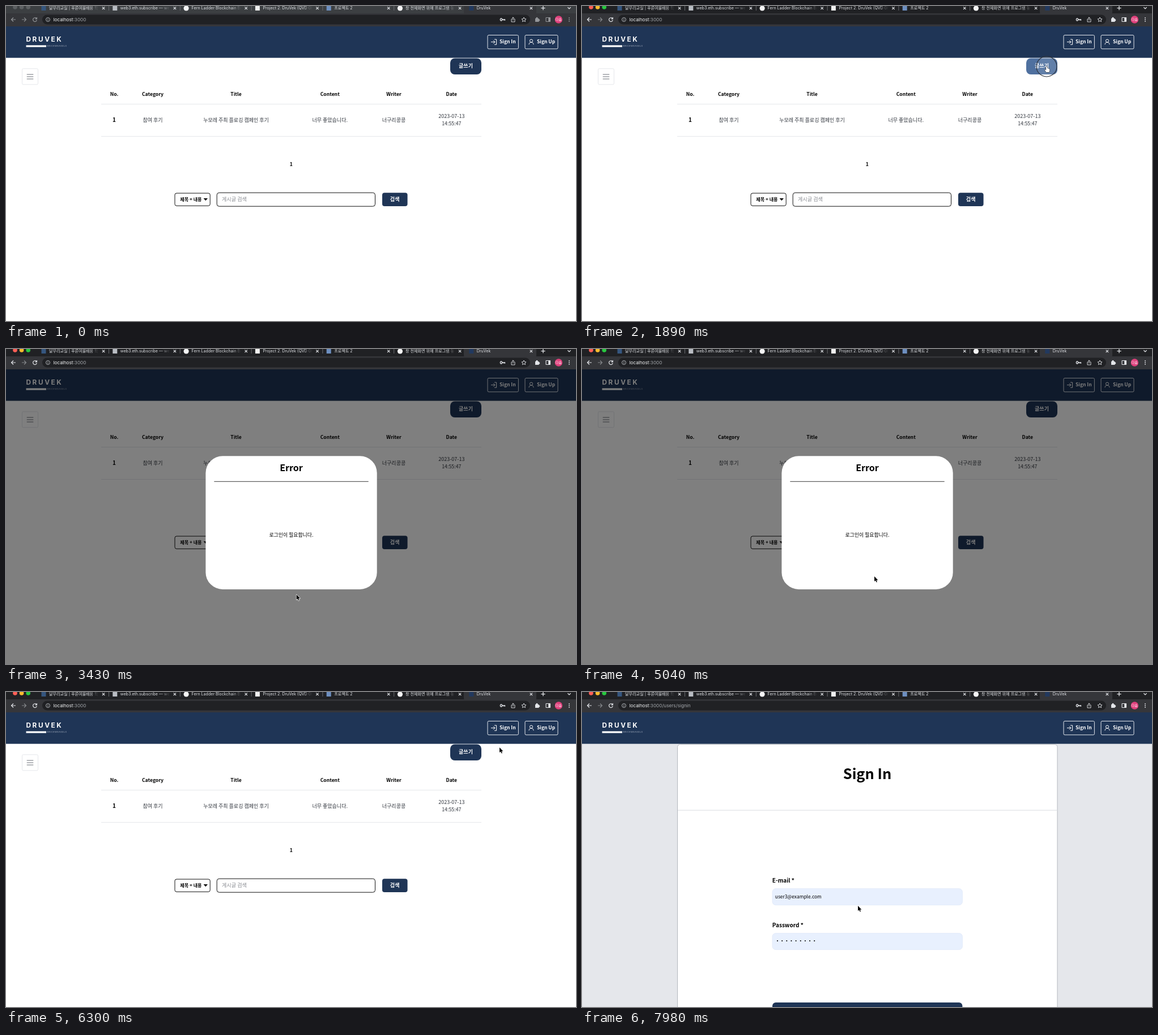
These frames come from a looping animation (1006 by 557 pixels, 8000 ms). An HTML page with a canvas:

```html
<!DOCTYPE html>
<html lang="ko">
<head>
<meta charset="utf-8">
<title>DruVek</title>
<style>
html, body { margin: 0; width: 100%; height: 100%; overflow: hidden; background: #fff; }
canvas { display: block; width: 1006px; height: 557px; }
</style>
</head>
<body>
<canvas id="stage"></canvas>
<script>
const W = 1006, H = 557, LOOP = 8000, STEP = 70;
const NAVY = '#1f3556', HOVER = '#4f709f', LINE = '#e5e7eb', INK = '#000', CELL = '#30353d', HINT = '#9a9da3';
const PAGE = '"Noto Sans CJK KR", "Noto Sans KR", "Noto Sans CJK", "Noto Sans", sans-serif';
const UI = 'Inter, "Noto Sans CJK KR", "Noto Sans CJK", sans-serif';

const T = {
  active: 1400, hoverOn: 1540, open: 1960, close: 5110,
  signIn: 6860, autofill: 7140
};
const CLICKS = [1330, 1820, 5045, 6720];

// Cursor legs: start, end, then the points passed through.
const LEGS = [
  [280, 350, [495, 503]],
  [350, 420, [584, 352]],
  [560, 770, [778, 136]],
  [910, 1120, [807, 115]],
  [1190, 1330, [820, 107]],
  [2310, 2520, [592, 329]],
  [2660, 2940, [497, 441]],
  [3010, 3080, [518, 424]],
  [3290, 3640, [511, 437], [540, 390], [533, 403]],
  [4060, 4270, [500, 423]],
  [4340, 4410, [520, 407]],
  [4760, 4970, [516, 402]],
  [5530, 5810, [481, 352], [560, 303]],
  [5950, 6090, [861, 112]],
  [6230, 6300, [871, 98]],
  [6300, 6510, [884, 67]],
  [7140, 7910, [487, 378]]
];

const canvas = document.getElementById('stage');
const ratio = window.devicePixelRatio || 1;
canvas.width = W * ratio;
canvas.height = H * ratio;
const g = canvas.getContext('2d');
g.scale(ratio, ratio);

const clamp = v => Math.max(0, Math.min(1, v));
const progress = (t, a, b) => clamp((t - a) / (b - a));
const ease = p => p * p * (3 - 2 * p);

function mix(a, b, p) {
  const part = (c, i) => parseInt(c.slice(i, i + 2), 16);
  return 'rgb(' + [1, 3, 5].map(i => Math.round(part(a, i) + (part(b, i) - part(a, i)) * p)) + ')';
}

function text(str, x, cy, size, { color = INK, weight = 400, align = 'left', font = PAGE, gap = 0 } = {}) {
  g.font = `${weight} ${size}px ${font}`;
  g.textAlign = align;
  g.letterSpacing = gap + 'px';
  g.fillStyle = color;
  g.fillText(str, x, cy + size * 0.36);
}

function rect(x, y, w, h, color) {
  g.fillStyle = color;
  g.fillRect(x, y, w, h);
}

function box(x, y, w, h, r, fill, stroke, width = 1) {
  g.beginPath();
  g.roundRect(x, y, w, h, r);
  if (fill) { g.fillStyle = fill; g.fill(); }
  if (stroke) { g.strokeStyle = stroke; g.lineWidth = width; g.stroke(); }
}

function disc(x, y, r, fill) {
  g.beginPath();
  g.arc(x, y, r, 0, 7);
  g.fillStyle = fill;
  g.fill();
}

function stroke(d, x, y, color, width = 1.1) {
  g.save();
  g.translate(x, y);
  g.strokeStyle = color;
  g.lineWidth = width;
  g.stroke(new Path2D(d));
  g.restore();
}

function fadeText(str, x, end) {
  const grad = g.createLinearGradient(x, 0, end, 0);
  grad.addColorStop(0, '#dfe1e5');
  grad.addColorStop(0.82, '#dfe1e5');
  grad.addColorStop(1, 'rgba(223,225,229,0)');
  g.save();
  g.beginPath();
  g.rect(x, 0, end - x, 13);
  g.clip();
  text(str, x, 3.4, 7.1, { color: grad, font: UI });
  g.restore();
}

const TABS = [
  '달무리교실 | 푸른여울배움 학습', 'web3.eth.subscribe — web3', 'Fern Ladder Blockchain Boot',
  'Project 2. DruVek (QVD 08)', '프로젝트 2', '창 전체화면 위에 프로그램 놓기', 'DruVek'
];

function tabIcon(i, x) {
  if (i === 2 || i === 5) return disc(x, 4, 4.6, '#f4f4f5');
  const color = ['#35567f', '#b9bdc3', '', '#f1f1f1', '#6d8fc0', '', '#22395f'][i];
  rect(x - 4, 0, 8, 8, color);
}

function chrome(active, path) {
  const light = '#e4e6ea', dim = '#85878b', tone = active ? light : '#94969a';
  rect(0, 0, W, 14, active ? '#202124' : '#3c3f42');
  box(808, -8, 128, 24, 5, '#35363a');
  rect(0, 13, W, 23, '#35363a');
  ['#ff5f57', '#febc2e', '#28c840'].forEach((c, i) => disc(16 + i * 11.6, 2, 3.8, active ? c : '#5d6063'));
  TABS.forEach((name, i) => {
    const x = 66.5 + i * 125.8;
    tabIcon(i, x);
    fadeText(name, x + 9.5, x + 97);
    stroke('M-2.2 -2.2L2.2 2.2M2.2 -2.2L-2.2 2.2', x + 105.6, 3.8, '#dfe1e5');
    if (i < 5) rect(x + 114.5, 0, 1, 8, '#6a6c70');
  });
  stroke('M-3.6 0H3.6M0 -3.6V3.6', 948, 3.6, light, 1.3);
  stroke('M-2.6 -1.3L0 1.3L2.6 -1.3', 994, 3.6, light, 1.3);

  const arrow = 'M4 0H-3.4M0 -3.5L-3.5 0L0 3.5';
  stroke(arrow, 13, 24, tone, 1.2);
  stroke('M-4 0H3.4M0 -3.5L3.5 0L0 3.5', 32, 24, dim, 1.2);
  stroke('M2.5 -2.2A3.4 3.4 0 1 0 3.3 1M3.4 -4V-1.2H0.6', 51, 24, tone, 1.2);
  box(64, 15.5, 861, 17, 8.5, '#202124');
  stroke('M3.5 0A3.5 3.5 0 1 1 -3.5 0A3.5 3.5 0 1 1 3.5 0M0 -0.4V2M0 -2V-1.1', 74, 24, '#bdc1c6', 0.9);
  const opt = { font: UI };
  text('localhost', 83.5, 24, 8.2, { ...opt, color: '#f1f3f4' });
  const x = 83.5 + g.measureText('localhost').width;
  text(':3000' + path, x, 24, 8.2, { ...opt, color: '#a4a8ad' });
  stroke('M-1 0A1.6 1.6 0 1 1 -4 0A1.6 1.6 0 1 1 -1 0H4V1.8M2 0V1.6', 876.5, 24, light, 1.3);
  stroke('M-1.5 -1H-3V4H3V-1H1.5M0 1.5V-4M-1.8 -2.4L0 -4.2L1.8 -2.4', 895, 24, light, 0.9);
  stroke('M0 -4L1.2 -1.3L4 -1L1.9 0.9L2.5 3.7L0 2.2L-2.5 3.7L-1.9 0.9L-4 -1L-1.2 -1.3Z', 914, 24, light, 0.9);
  rect(934, 22, 6.5, 6, tone);
  disc(937, 21.5, 1.7, tone);
  disc(940.6, 25, 1.7, tone);
  box(953, 20.5, 7.5, 7, 0.5, null, tone, 1.1);
  rect(957.2, 20.5, 3.3, 7, tone);
  disc(975.3, 24, 6.7, '#e0407c');
  text('다솜', 975.3, 24, 6, { color: '#fff', align: 'center' });
  for (let i = -1; i < 2; i++) disc(994, 24 + i * 3, 0.9, tone);
}

function header() {
  rect(0, 36, W, 55.8, NAVY);
  text('DRUVEK', 35.5, 59, 11.8, { color: '#fff', weight: 700, font: UI, gap: 2.6 });
  rect(35.5, 69.4, 35.5, 3.2, '#fff');
  text('BRICKWEASELS', 72.5, 71, 3.7, { color: '#aab3c2', font: UI, gap: 0.55 });
  box(850, 51.5, 54.4, 24.3, 2, null, '#e3e7ed');
  box(916, 51.5, 58, 24.3, 2, null, '#e3e7ed');
  stroke('M-5 0H2M-1 -3L2 0L-1 3M1 -4.6H4.6V4.6H1', 861, 63.6, '#fff', 1);
  stroke('M2.6 -1.8A2.6 2.6 0 1 1 -2.6 -1.8A2.6 2.6 0 1 1 2.6 -1.8M-4 4.8C-4 2 -2 0.8 0 0.8S4 2 4 4.8', 927, 63.4, '#fff', 1);
  text('Sign In', 871, 63, 8.5, { color: '#fff', weight: 700 });
  text('Sign Up', 937, 63, 8.5, { color: '#fff', weight: 700 });
}

const COLUMNS = [
  ['No.', 191, '1'], ['Category', 259, '참여 후기'], ['Title', 406, '누모레 주최 플로깅 캠페인 후기'],
  ['Content', 571.7, '너무 좋았습니다.'], ['Writer', 684.5, '너구리콩콩'], ['Date', 786.3, '']
];

function board(hover) {
  const mid = { align: 'center' }, strong = { align: 'center', weight: 700 };
  rect(0, 91.8, W, H, '#fff');
  box(28.5, 110.8, 28, 28, 2, '#fff', LINE);
  for (let y = 121; y < 130; y += 4) rect(36.7, y - 0.5, 11.6, 1, '#6b6f76');
  box(784, 92.5, 55, 28.5, 8, mix(NAVY, HOVER, hover));
  text('글쓰기', 811.5, 106, 9, { ...strong, color: '#fff' });

  COLUMNS.forEach(([head, x, cell], i) => {
    text(head, x, 155.8, 8.6, strong);
    text(cell, x, 201.3, i ? 9 : 10, i ? { ...mid, color: CELL } : strong);
  });
  text('2023-07-13', 786.3, 194.3, 9, { ...mid, color: CELL });
  text('14:55:47', 786.3, 208.3, 8.8, { ...mid, color: CELL });
  rect(168, 173, 671, 1, LINE);
  rect(168, 230, 671, 1, LINE);
  text('1', 503.4, 279.5, 8.6, strong);

  box(298, 331, 62.2, 22.3, 3, '#fff', '#111');
  text('제목 + 내용', 307.3, 341.7, 8.1, { weight: 700 });
  g.fillStyle = INK;
  g.fill(new Path2D('M348.6 340H356L352.3 344.3Z'));
  box(372.2, 330.2, 279.3, 24, 4, '#fff', '#111');
  text('게시글 검색', 381, 341.7, 9.1, { color: '#85888e' });
  box(664, 330.3, 44.6, 23.6, 4, NAVY);
  text('검색', 686.2, 341.7, 9.1, { ...strong, color: '#fff' });
}

function modal() {
  rect(0, 36, W, H, 'rgba(0,0,0,0.5)');
  box(352.4, 189.3, 302.3, 235.6, 30, '#fff');
  text('Error', 503.5, 210.5, 16, { align: 'center', weight: 700 });
  rect(367.3, 233.8, 272.4, 1, '#3a3a3a');
  text('로그인이 필요합니다.', 503.4, 328.8, 8.9, { align: 'center' });
}

function field(label, y, filled) {
  text(label, 335.8, y - 14, 10, { weight: 700 });
  box(336, y, 335.4, 29, 6, filled ? '#e8f0fe' : '#fff', filled ? '#e3ebfa' : LINE);
}

function login(filled, ready) {
  rect(0, 91.8, W, H, LINE);
  box(168.5, 92.5, 670.5, H, 5, '#fff', '#b4b8be');
  text('Sign In', 503.5, 145, 25.4, { align: 'center', weight: 700 });
  rect(169, 208.5, 669.5, 1.2, '#dfe1e5');
  field('E-mail *', 347.7, filled);
  field('Password *', 426.6, filled);
  if (filled) {
    text('user3@example.com', 340.8, 361.5, 8.4);
    for (let i = 0; i < 9; i++) disc(345 + i * 8.15, 440, 1.05, INK);
  } else {
    text('example@inbox.test', 340.8, 361.5, 8.4, { color: HINT });
    text('비밀번호를 입력하세요', 340.8, 440.2, 8.9, { color: HINT });
  }
  box(336, 549, 335.4, 30, 6, mix('#6b7280', NAVY, ready));
}

function along(points, p) {
  const s = p * (points.length - 1);
  const i = Math.min(Math.floor(s), points.length - 2);
  const [a, b] = [points[i], points[i + 1]];
  return [a[0] + (b[0] - a[0]) * (s - i), a[1] + (b[1] - a[1]) * (s - i)];
}

function cursorAt(t) {
  let pos = LEGS[0][2];
  for (const [a, b, ...points] of LEGS) {
    if (t <= a) break;
    pos = along([pos, ...points], ease(progress(t, a, b)));
  }
  return pos;
}

const ARROW = new Path2D('M0 0V9L2.1 7.2L3.6 10.5L5 9.9L3.6 6.7H6.4Z');
const HAND = new Path2D('M-0.9 0Q0.1 -1.2 1.1 0V3.2Q2.2 2.8 2.8 3.6Q3.8 3.2 4.2 4.2Q5.4 4 5.4 5.2V7.2L4.4 10H-0.8L-3.2 6.6Q-3.6 5 -2.2 5.4L-0.9 6.6Z');

function cursor(t) {
  if (t < 350) return;
  const [x, y] = cursorAt(t);
  const click = CLICKS.find(c => t > c && t < c + 140);
  if (click) {
    g.beginPath();
    g.arc(x, y, 14 + 8 * progress(t, click, click + 140), 0, 7);
    g.fillStyle = 'rgba(255,255,255,0.1)';
    g.fill();
    g.strokeStyle = '#2b2f36';
    g.lineWidth = 1.1;
    g.stroke();
  }
  const hand = (t >= T.active && t < 2030) || (t >= 6440 && t <= T.autofill);
  g.save();
  g.translate(x, y);
  g.lineJoin = 'round';
  g.lineWidth = hand ? 1 : 1.4;
  g.strokeStyle = hand ? '#111' : '#fff';
  g.fillStyle = hand ? '#fff' : '#000';
  g.stroke(hand ? HAND : ARROW);
  g.fill(hand ? HAND : ARROW);
  g.restore();
}

function draw(t) {
  const signIn = t >= T.signIn;
  rect(0, 0, W, H, '#fff');
  chrome(t >= T.active, signIn ? '/users/signin' : '');
  header();
  if (signIn) {
    login(t >= T.autofill, progress(t, T.autofill - 70, T.autofill + 140));
  } else {
    board(ease(progress(t, T.hoverOn, 1750)) - ease(progress(t, T.open, 2170)));
    if (t >= T.open && t < T.close) modal();
  }
  cursor(t);
}

const start = performance.now();
function frame() {
  const t = (performance.now() - start) % LOOP;
  draw(Math.floor(t / STEP) * STEP);
  requestAnimationFrame(frame);
}
frame();
</script>
</body>
</html>
```
